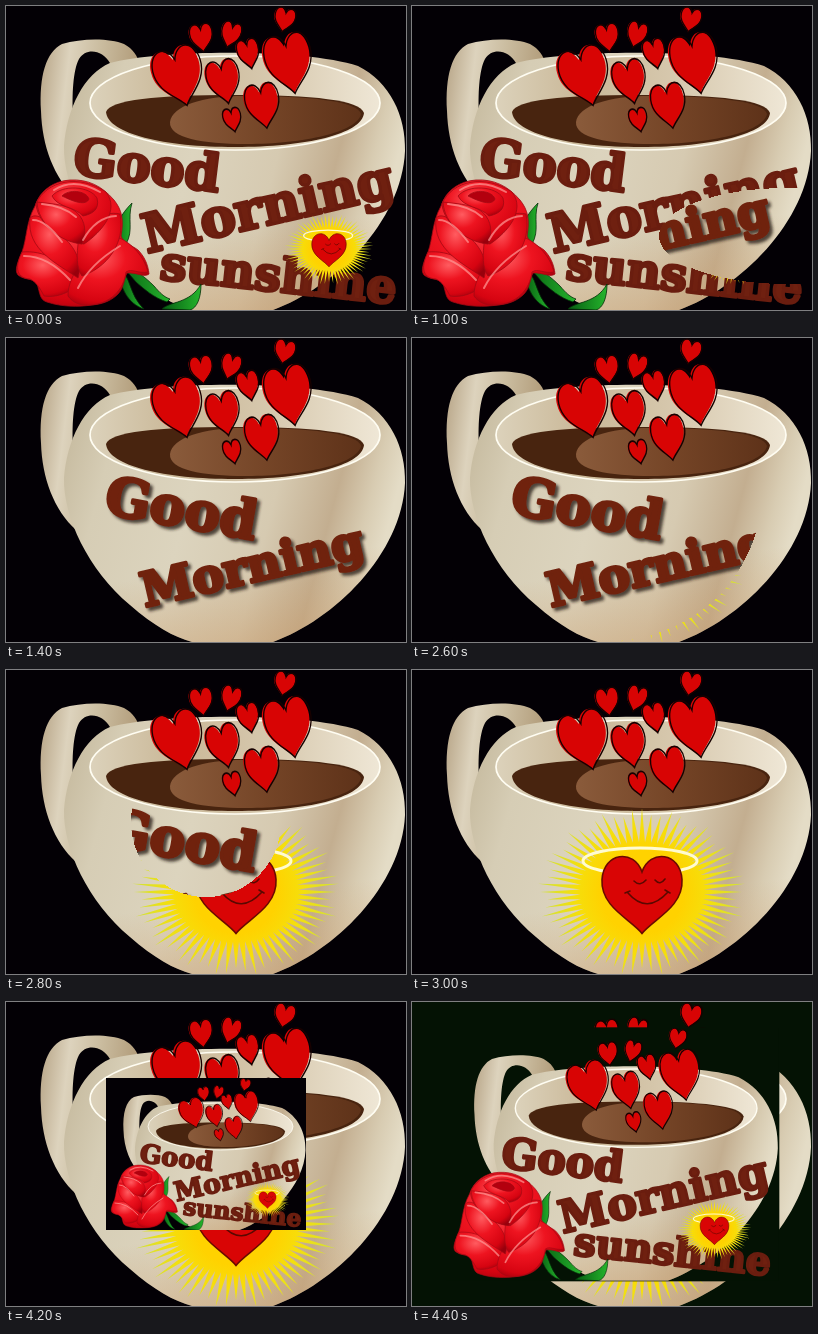
These frames come from a looping animation (400 by 304 pixels, 4.5 s). An HTML page:

```html
<!DOCTYPE html>
<html lang="en">
<head>
<meta charset="utf-8">
<title>Good Morning sunshine</title>
<style>
html, body { margin: 0; width: 100%; height: 100%; overflow: hidden; background: #030005; }
svg { position: absolute; left: 0; top: 0; width: 400px; height: 304px; background: #030005; overflow: hidden; }
text { font: 700 51px "DejaVu Serif", "Noto Serif", serif; stroke-width: 3.4; stroke-linejoin: round; }

.greeting, .morning, .sun { animation: 4.5s step-end infinite; }
.greeting { animation-name: zoom; transform-origin: 200px 152px; }
.morning { animation-name: iris; }
.sun { animation-name: tint; }

/* Full picture, hidden, then growing from the centre in sixths */
@keyframes zoom {
  0% { visibility: visible; transform: none; background: #030005; }
  31.111% { visibility: hidden; transform: none; }
  88.888% { visibility: visible; transform: scale(.16667); }
  91.111% { visibility: visible; transform: scale(.33333); }
  93.333% { visibility: visible; transform: scale(.5); }
  95.555% { visibility: visible; transform: scale(.66667); background: #030005; }
  97.777%, 100% { visibility: visible; transform: scale(.83333); background: #041204; }
}
/* Opens as a growing ellipse, closes as a shrinking circle; masks keep the edge hard */
@keyframes iris {
  0% { visibility: hidden; -webkit-mask-image: none; }
  22.222% { visibility: visible; -webkit-mask-image: radial-gradient(128px 48px at 375px 230px, #000 100%, transparent 0); }
  24.444% { visibility: visible; -webkit-mask-image: radial-gradient(256px 96px at 375px 230px, #000 100%, transparent 0); }
  26.666% { visibility: visible; -webkit-mask-image: radial-gradient(384px 144px at 375px 230px, #000 100%, transparent 0); }
  28.888% { visibility: visible; -webkit-mask-image: radial-gradient(512px 192px at 375px 230px, #000 100%, transparent 0); }
  31.111% { visibility: visible; -webkit-mask-image: none; }
  57.777% { visibility: visible; -webkit-mask-image: radial-gradient(150px 150px at 200px 152px, #000 100%, transparent 0); }
  60% { visibility: visible; -webkit-mask-image: radial-gradient(112px 112px at 200px 152px, #000 100%, transparent 0); }
  62.222% { visibility: visible; -webkit-mask-image: radial-gradient(75px 75px at 200px 152px, #000 100%, transparent 0); }
  64.444% { visibility: visible; -webkit-mask-image: radial-gradient(37px 37px at 200px 152px, #000 100%, transparent 0); }
  66.666%, 100% { visibility: hidden; -webkit-mask-image: none; }
}
@keyframes tint {
  0% { background: #030005; }
  97.777%, 100% { background: #041204; }
}
</style>
</head>
<body>

<svg class="sun" viewBox="0 0 400 304">
  <defs>
    <linearGradient id="clay" x1="0" y1=".1" x2="1" y2=".3">
      <stop offset="0" stop-color="#c4b89c"/><stop offset=".16" stop-color="#d6cdb5"/>
      <stop offset=".42" stop-color="#dcd4be"/><stop offset=".66" stop-color="#d6cab1"/>
      <stop offset=".83" stop-color="#c3ae90"/><stop offset=".93" stop-color="#d8ccb2"/>
      <stop offset="1" stop-color="#e4dcc6"/>
    </linearGradient>
    <linearGradient id="base" x1=".4" y1=".3" x2=".6" y2="1">
      <stop offset=".35" stop-color="#c89a68" stop-opacity="0"/>
      <stop offset="1" stop-color="#c89a68" stop-opacity=".45"/>
    </linearGradient>
    <linearGradient id="grip" x1="0" y1="0" x2="1" y2=".2">
      <stop offset="0" stop-color="#b5a284"/><stop offset=".3" stop-color="#ddd3bd"/>
      <stop offset=".6" stop-color="#cabc9f"/><stop offset="1" stop-color="#b09a78"/>
    </linearGradient>
    <linearGradient id="bowl">
      <stop offset="0" stop-color="#dcd2bb"/><stop offset=".3" stop-color="#c9b797"/>
      <stop offset=".65" stop-color="#d8cab0"/><stop offset="1" stop-color="#efe7d6"/>
    </linearGradient>
    <linearGradient id="brew">
      <stop offset="0" stop-color="#8a5b3b"/><stop offset=".5" stop-color="#754527"/>
      <stop offset="1" stop-color="#5e3219"/>
    </linearGradient>
    <radialGradient id="glow" gradientUnits="userSpaceOnUse" cx="230" cy="222" r="103">
      <stop offset=".4" stop-color="#ffd200"/><stop offset=".65" stop-color="#f5df0c"/>
      <stop offset="1" stop-color="#cfe23c"/>
    </radialGradient>
    <radialGradient id="petal" cx=".4" cy=".3" r=".8">
      <stop offset="0" stop-color="#ff5c60"/><stop offset=".4" stop-color="#ee1420"/>
      <stop offset=".8" stop-color="#d60411"/><stop offset="1" stop-color="#98000c"/>
    </radialGradient>
    <linearGradient id="leaf">
      <stop offset="0" stop-color="#075c12"/><stop offset="1" stop-color="#25b52c"/>
    </linearGradient>
    <filter id="shade" x="-10%" y="-20%" width="125%" height="150%">
      <feDropShadow dx="3" dy="3" stdDeviation="1.8" flood-color="#2a2018" flood-opacity=".8"/>
    </filter>
    <path id="heart" d="M0 .5C-.13 .32-.52 .16-.5-.2C-.48-.56-.1-.6 0-.3C.1-.6 .48-.56 .5-.2C.52 .16 .13 .32 0 .5Z"/>

    <g id="cup">
      <path fill="url(#grip)" fill-rule="evenodd" d="M70 192C48 172 36 140 35 105C33 70 40 46 56 38C76 32 104 32 118 38C127 43 132 50 133 58L100 100ZM104 57C97 44 80 41 73 53C67 64 66 90 67 108L90 90Z"/>
      <path id="body" fill="url(#clay)" d="M104 57C78 68 61 102 58 140C57 178 82 232 124 267C148 288 168 299 186 304H267C328 282 396 216 399 145C400 110 384 76 352 60C300 43 160 43 104 57Z"/>
      <path fill="url(#base)" d="M58 140C57 178 82 232 124 267C148 288 168 299 186 304H267C328 282 396 216 399 145Z"/>
      <ellipse cx="229" cy="97" rx="145" ry="47" fill="url(#bowl)" stroke="#fffdf2" stroke-width="1.7"/>
      <path fill="#48240f" d="M100 106C104 94 150 89 229 89C308 89 354 94 358 107C356 128 300 141 229 141C158 141 102 128 100 106Z"/>
      <path fill="url(#brew)" d="M164 116C166 100 196 90 238 90C302 90 352 95 355 108C351 126 298 138 240 138C196 138 163 132 164 116Z"/>
      <g id="steam"></g>
    </g>

    <g id="face">
      <path id="rays" fill="url(#glow)"/>
      <ellipse cx="228" cy="191" rx="57" ry="13" fill="none" stroke="#fffbd0" stroke-width="3"/>
      <use href="#heart" transform="translate(230 225) scale(80 77)" fill="#d90505" stroke="#6b0a00" stroke-width=".02"/>
      <path fill="none" stroke="#5a0800" stroke-width="1.6" stroke-linecap="round" d="M216 223Q235 245 256 222M213 223l5-2M253 220l5 3M222 211Q228 217 234 210M243 210Q248 216 253 209"/>
    </g>
  </defs>
  <use href="#cup"/>
  <use href="#face"/>
</svg>

<svg class="greeting" viewBox="0 0 400 304">
  <use href="#cup"/>
  <g fill="#6f2010" stroke="#6a1d0f">
    <text transform="translate(66 168) rotate(7)">Good</text>
    <text transform="translate(141 247) rotate(-13)" style="font-size:53px">Morning</text>
    <text transform="translate(153 273) rotate(6)" style="font-size:47px">sunshine</text>
  </g>
  <use href="#face" transform="translate(323 243) scale(.43) translate(-230 -222)"/>
  <g stroke="#052c08" stroke-width=".8" fill="url(#leaf)">
    <path d="M106 238C108 220 115 208 126 197C121 213 128 224 120 238Z"/>
    <path d="M112 255C128 262 140 272 148 280C154 287 158 291 164 293L161 296C148 292 138 283 130 276Z"/>
    <path d="M156 303C164 295 184 298 195 278C195 292 191 302 184 304Z"/>
    <path d="M112 262C126 270 122 288 138 303C122 298 114 282 112 262Z"/>
  </g>
  <g fill="url(#petal)" stroke="#a30a14" stroke-width=".8">
    <path d="M29 200C20 216 21 232 16 246C12 256 8 264 12 269C18 274 26 272 31 277C34 288 34 294 41 296C56 301 72 301 86 299C98 298 106 294 112 288C118 282 118 272 121 267C130 266 138 272 143 268C142 258 138 250 132 244C124 238 118 238 115 230C118 214 116 204 108 194C96 180 82 173 64 174C48 175 34 184 29 200Z"/>
    <path d="M16 246C36 244 58 254 74 276C64 288 48 292 38 290C34 282 30 276 24 273C8 272 10 258 16 246Z"/>
    <path d="M62 290C62 268 80 246 114 232C126 238 138 250 142 266C132 268 126 262 120 266C118 284 104 298 84 299C74 300 66 296 62 290Z"/>
    <path d="M24 212C32 204 46 220 58 232C72 244 76 260 72 272C52 258 20 244 24 212Z"/>
    <path d="M114 208C96 204 80 218 72 238C70 256 72 264 76 270C100 262 120 238 114 208Z"/>
    <path d="M30 198C40 174 74 168 100 186C114 204 96 226 78 238C58 236 32 220 30 198Z"/>
    <path d="M31 196C46 198 66 198 74 210C81 220 79 230 76 238C54 236 32 218 31 196Z"/>
    <path d="M46 190C56 178 84 180 91 192C94 204 86 208 77 210C68 200 52 202 46 190Z"/>
    <path fill="#b3000e" d="M56 190C62 183 80 184 83 193C80 200 68 196 56 190Z"/>
  </g>
  <g fill="none" stroke="#ff9a98" stroke-width="2" stroke-linecap="round" opacity=".7">
    <path d="M36 198Q58 200 70 211M27 214Q40 214 56 236M110 210Q90 211 77 234M18 250Q42 250 64 274M72 282Q84 258 114 240M48 184Q68 171 94 186"/>
  </g>
</svg>

<svg class="morning" viewBox="0 0 400 304">
  <use href="#cup"/>
  <g fill="#6f2410" stroke="#6f2410" filter="url(#shade)">
    <text transform="translate(97 175) rotate(10)" style="font-size:53px">Good</text>
    <text transform="translate(139 269) rotate(-13)" style="font-size:47px">Morning</text>
  </g>
</svg>

<script>
// Steam hearts: centre x, centre y, width, height, tilt
const hearts = [
  [172, 71, 49, 59, -17], [195, 32, 23, 28, -10], [224, 29, 20, 26, 14],
  [278, 14, 21, 24, 10], [282, 58, 47, 60, -13], [242, 48, 22, 30, -14],
  [217, 76, 33, 44, -14], [256, 100, 34, 45, -12], [226, 114, 18, 24, -14]
];
const mark = (x, y, w, h, tilt, paint) =>
  `<use href="#heart" transform="translate(${x} ${y}) rotate(${tilt}) scale(${w} ${h})" ${paint}/>`;
document.getElementById('steam').innerHTML = hearts.map(([x, y, w, h, tilt]) =>
  mark(x, y, w, h, tilt, 'fill="#d80404"') +
  mark(x + w * .03, y, w, h, tilt + 2,
    `fill="none" stroke="#180000" stroke-width="${1.3 / w}"`)
).join('');

// Starburst with uneven spikes
const spikes = 64;
const points = Array.from({ length: spikes * 2 }, (_, i) => {
  const angle = i * Math.PI / spikes;
  const reach = i % 2 ? .6 : .97 + .05 * Math.sin(i * 2.3);
  return `${(230 + 103 * reach * Math.cos(angle)).toFixed(1)} ${(222 + 83 * reach * Math.sin(angle)).toFixed(1)}`;
});
document.getElementById('rays').setAttribute('d', `M${points.join('L')}Z`);
</script>
</body>
</html>
```
